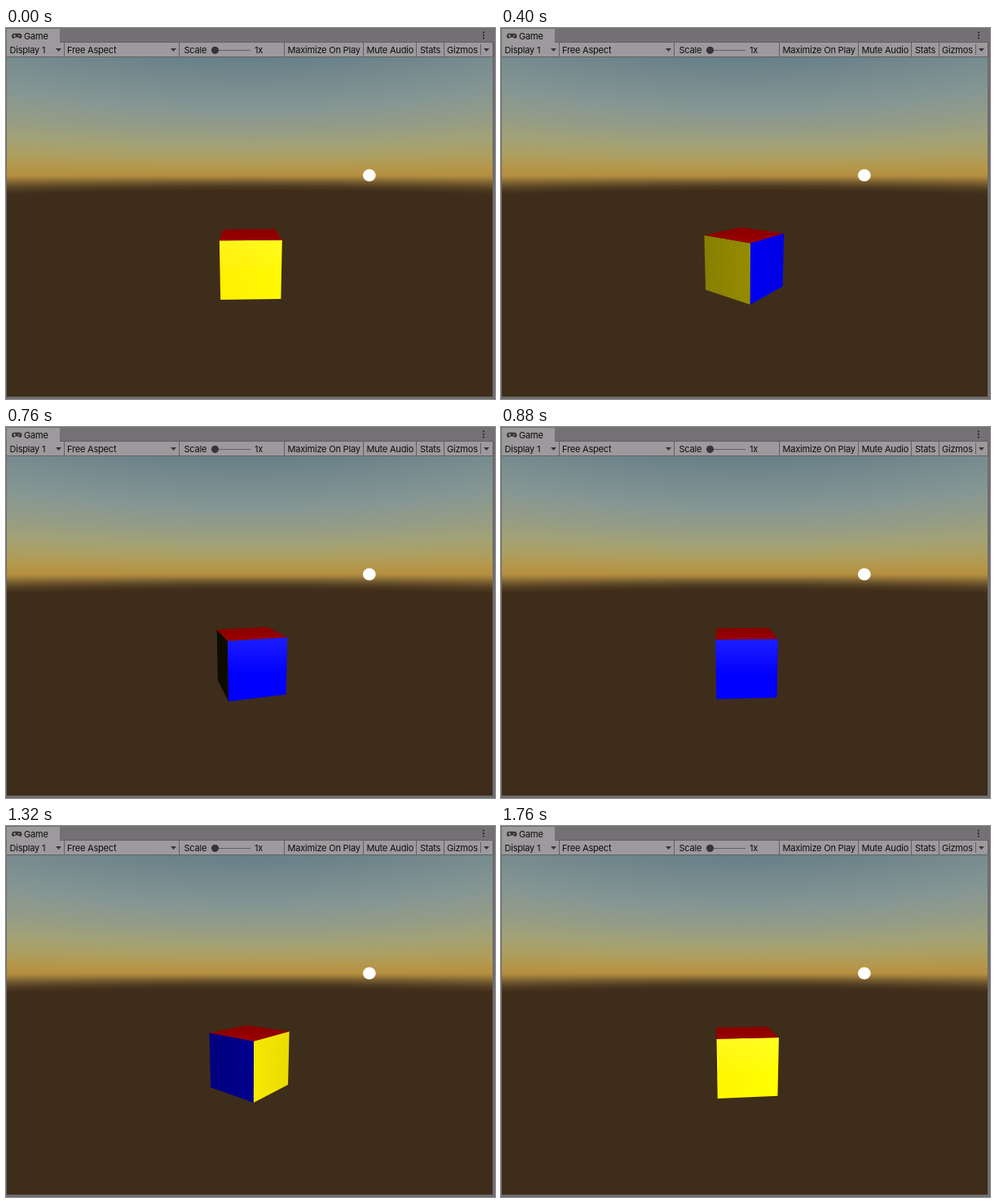
An HTML page with a canvas that plays this animation: 600 by 456 pixels, repeating every 1.8 s.

```html
<!DOCTYPE html>
<html lang="en">
<head>
<meta charset="utf-8">
<title>Rotating cube</title>
<style>
  html, body { margin: 0; width: 100%; height: 100%; overflow: hidden; background: #6e6c6e; }
  canvas, svg { position: absolute; left: 0; top: 0; display: block; }
  text { font: 11px Inter, "Liberation Sans", sans-serif; letter-spacing: -.2px; fill: #0c0c0c; }
  .line { stroke: #626062; fill: none; }
  .dark { fill: #373537; }
</style>
</head>
<body>
<canvas id="scene" width="600" height="456"></canvas>
<svg width="600" height="456" viewBox="0 0 600 456">
  <rect width="600" height="18" fill="#747174"/>
  <rect x="1" y="1" width="65" height="17" fill="#9d9a9d"/>
  <rect x="1" y="17.5" width="597" height="18" fill="#9d9a9d"/>
  <path class="line" d="M66 17.5H598M1 35.5H598M71.5 18V35M212.5 18V35M341.5 18V35M438.5 18V35M503.5 18V35M537.5 18V35M582.5 20V33M597.5 18V35"/>
  <path class="dark" d="M10 6.8h6.5a3 3 0 0 1 2.8 4.2c-.7 2.6-2.6 2.4-3.8.6h-4.5c-1.2 1.8-3.1 2-3.8-.6a3 3 0 0 1 2.8-4.2z"/>
  <path d="M9 9.5h3M10.5 8v3M15 9.5h2" stroke="#9d9a9d" fill="none"/>
  <g fill="#1c1b1c">
    <circle cx="586" cy="5.5" r="1"/><circle cx="586" cy="9" r="1"/><circle cx="586" cy="12.5" r="1"/>
  </g>
  <path class="dark" d="M61 25h7l-3.5 4zM202 25h7l-3.5 4zM586 25h7l-3.5 4z"/>
  <path class="line" d="M256 27.5H300"/>
  <circle class="dark" cx="256.5" cy="27.3" r="4.6"/>
  <text x="22" y="14">Game</text>
  <text x="4.5" y="31">Display 1</text>
  <text x="75" y="31">Free Aspect</text>
  <text x="218.5" y="31">Scale</text>
  <text x="305" y="31">1x</text>
  <text x="345.5" y="31">Maximize On Play</text>
  <text x="442.5" y="31">Mute Audio</text>
  <text x="508" y="31">Stats</text>
  <text x="541" y="31">Gizmos</text>
</svg>
<script>
const LOOP = 1800, STEP = 40, TURN = 4;
const FOCAL = 361, CX = 299.1, CY = 245, HORIZON = 181;
const RAD = Math.PI / 180;
const PITCH_SIN = Math.sin(10 * RAD), PITCH_COS = Math.cos(10 * RAD);
const YELLOW = [255, 240, 2], BLUE = [0, 0, 255];
const LIGHT = 21;

const ctx = document.getElementById('scene').getContext('2d');
const backdrop = document.createElement('canvas');
backdrop.width = 600;
backdrop.height = 456;

// Heights are those at the middle column; bands spread out toward the sides.
const SKY = [
  [36, '#677f88'], [70, '#778c8f'], [100, '#859693'], [125, '#949c87'],
  [145, '#a2a277'], [160, '#ac9f62'], [172, '#b4984c'], [181, '#b58f40'],
  [184, '#a17f3b'], [189, '#745b2f'], [194, '#523e22'], [199, '#402e1b'], [206, '#3e2d1a']
];

function paintBackdrop() {
  const c = backdrop.getContext('2d');
  const first = SKY[0][0], last = SKY[SKY.length - 1][0];
  c.fillStyle = '#6e6c6e';
  c.fillRect(0, 0, 600, 456);
  for (let x = 1; x < 597; x += 2) {
    const spread = Math.hypot(FOCAL, x + 1 - CX) / FOCAL;
    const at = y => HORIZON + (y - HORIZON) * spread;
    const g = c.createLinearGradient(0, at(first), 0, at(last));
    for (const [y, color] of SKY) g.addColorStop((y - first) / (last - first), color);
    c.fillStyle = g;
    c.fillRect(x, 36, 2, 417);
  }
  c.fillStyle = '#fff';
  c.beginPath();
  c.ellipse(445.8, 181, 7.9, 7.5, 0, 0, 7);
  c.fill();
}

// Corner of the unit cube at a compass angle (0 faces the camera).
function corner(angle, height) {
  const near = Math.SQRT1_2 * Math.cos(angle * RAD);
  const side = Math.SQRT1_2 * Math.sin(angle * RAD);
  const up = -0.6136 - PITCH_SIN * near + PITCH_COS * height;
  const depth = 5.269 - PITCH_COS * near - PITCH_SIN * height;
  return [CX + FOCAL * side / depth, CY - FOCAL * up / depth];
}

function fillPoly(points, style) {
  ctx.beginPath();
  points.forEach(p => ctx.lineTo(...p));
  ctx.closePath();
  ctx.fillStyle = style;
  ctx.fill();
}

const shade = (color, k) => `rgb(${color.map(v => Math.round(Math.min(255, v * k))).join()})`;

function drawSide(angle, color) {
  const quad = [corner(angle - 45, .5), corner(angle + 45, .5), corner(angle + 45, -.5), corner(angle - 45, -.5)];
  const [tl, tr, br, bl] = quad;
  if (tr[0] <= tl[0]) return;
  const off = (angle - LIGHT) * RAD;
  const level = Math.max(.05, 1.08 * Math.cos(off));
  const tilt = .06 * Math.sin(off);
  const g = ctx.createLinearGradient(tl[0], tl[1], br[0], tl[1]);
  g.addColorStop(0, shade(color, level * (1 + tilt)));
  g.addColorStop(1, shade(color, level * (1 - tilt)));
  fillPoly(quad, g);

  const gloss = .13 * Math.max(0, Math.cos((angle - 10) * RAD)) ** 16;
  const top = Math.min(tl[1], tr[1]);
  const shine = ctx.createLinearGradient(0, top, 0, top + 45);
  shine.addColorStop(0, `rgba(255,255,255,${gloss})`);
  shine.addColorStop(1, 'rgba(255,255,255,0)');
  fillPoly(quad, shine);
}

function draw(time) {
  const turn = Math.floor(time % LOOP / STEP) * TURN;
  ctx.drawImage(backdrop, 0, 0);
  const faces = [0, 1, 2, 3].map(i => {
    const angle = 2 + i * 90 - turn;
    drawSide(angle, i % 2 ? BLUE : YELLOW);
    return corner(angle - 45, .5);
  });
  const red = ctx.createLinearGradient(0, 245, 0, 265);
  red.addColorStop(0, '#880000');
  red.addColorStop(1, '#9c0000');
  fillPoly(faces, red);
}

function tick() {
  draw(performance.now());
  requestAnimationFrame(tick);
}

paintBackdrop();
tick();
</script>
</body>
</html>
```
